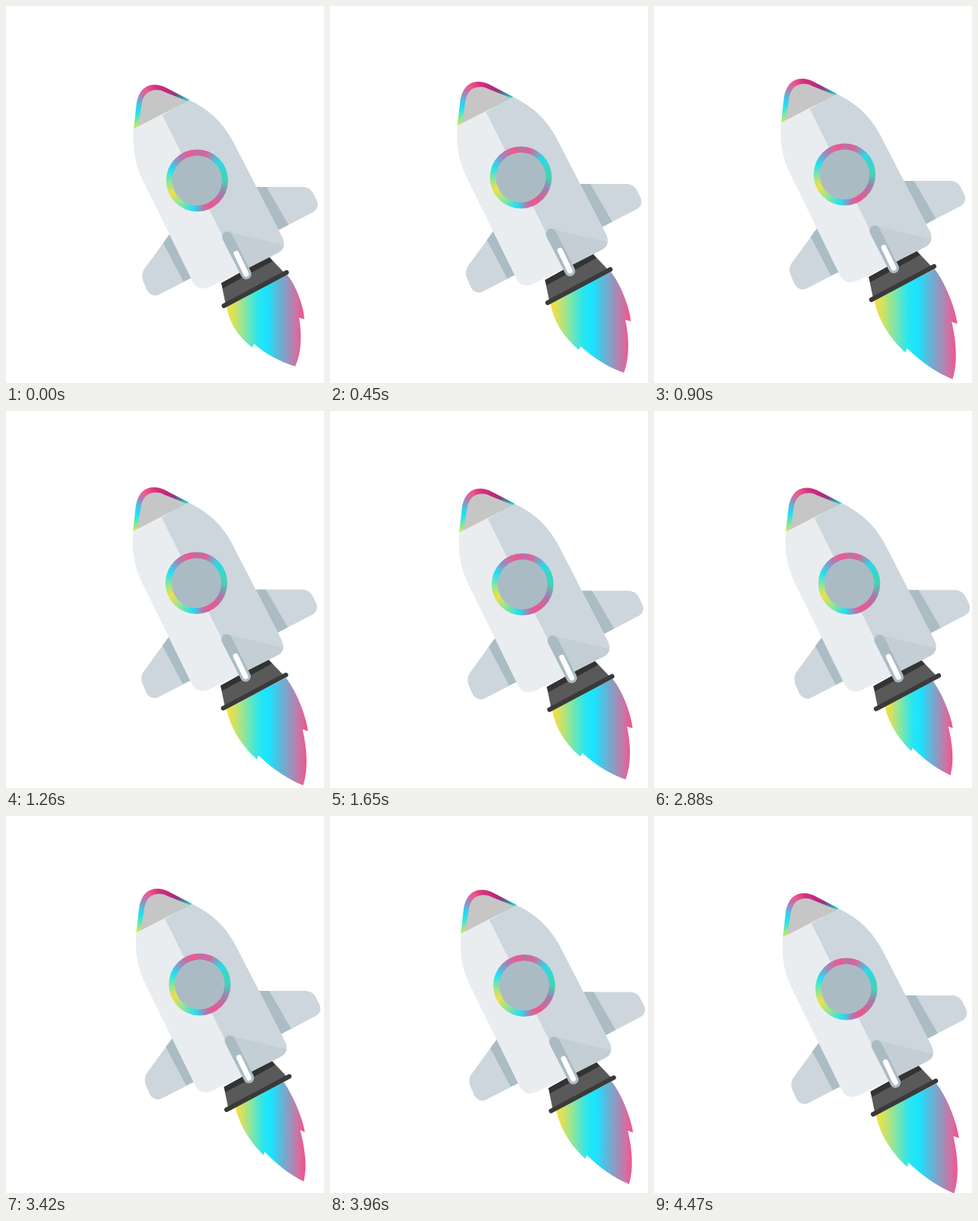
An HTML page with a canvas that plays this animation: 421 by 498 pixels, repeating every 4.5 s.

```html
<!DOCTYPE html>
<html>
<head>
<meta charset="utf-8">
<title>Rocket</title>
<style>
html, body { margin: 0; height: 100%; overflow: hidden; background: #fff; }
canvas { display: block; }
</style>
</head>
<body>
<canvas id="stage" width="421" height="498"></canvas>
<script>
const ctx = document.getElementById('stage').getContext('2d');
const LOOP = 4500, STEP = 30, TILT = 27.4;

// time, rocket x, rocket y, flame width, flame length
const poses = [
  [0, 0, 0, 1, 1],
  [900, -.7, -8, 1, 1.245],
  [1650, 2, -1.5, 1, 1.12],
  [2160, 3.5, -7, .93, 1.205],
  [2880, 5.5, -2.5, .8, 1.075],
  [3420, 3.5, -8, .8, 1.145],
  [4470, 1.6, -2, 1, 1.24]
];
const shake = [3.2, 2.6, .03, .05];

const flame = new Path2D('M292 396C295 419 309 438 326 451L328.5 446.5C345 460 362 470 383 476C392 456 391.5 432 388 412L395 413.5C394 396 384 369 372 355Z');

function fill(path, style) {
  ctx.fillStyle = style;
  ctx.fill(typeof path === 'string' ? new Path2D(path) : path);
}

function line(x1, y1, x2, y2, width, color) {
  ctx.beginPath();
  ctx.moveTo(x1, y1);
  ctx.lineTo(x2, y2);
  ctx.lineWidth = width;
  ctx.strokeStyle = color;
  ctx.stroke();
}

function disc(x, y, r, style) {
  ctx.beginPath();
  ctx.arc(x, y, r, 0, 2 * Math.PI);
  ctx.fillStyle = style;
  ctx.fill();
}

function addStops(gradient, stops) {
  for (const [at, color] of stops) gradient.addColorStop(at, color);
  return gradient;
}

const noseRainbow = addStops(ctx.createConicGradient(0, 205, 140), [
  [.4, '#e6e84a'], [.45, '#6fe6a8'], [.5, '#1fe3f2'], [.55, '#3cc8e8'],
  [.61, '#b07fb4'], [.66, '#f0568f'], [.72, '#d0327f'], [.8, '#c0267c'],
  [.86, '#85407f'], [.91, '#2f9fae'], [.94, '#27e0d8']
]);
const ringRainbow = addStops(ctx.createConicGradient(0, 253, 230.5), [
  [0, '#45d3b4'], [.07, '#a57cae'], [.17, '#ee5590'], [.21, '#c070a8'],
  [.27, '#22def5'], [.35, '#8fe59a'], [.43, '#efe04a'], [.48, '#a0e588'],
  [.56, '#20e2f5'], [.64, '#a584b8'], [.71, '#f0568f'], [.76, '#b872a6'],
  [.8, '#e0609a'], [.88, '#2cd8e6'], [1, '#45d3b4']
]);

function poseAt(time) {
  const i = Math.max(1, poses.findIndex(p => p[0] >= time));
  const a = poses[i - 1], b = poses[i];
  const span = b[0] - a[0], p = (time - a[0]) / span;
  const turns = Math.round(span / 190);
  return shake.map((size, k) =>
    a[k + 1] + (b[k + 1] - a[k + 1]) * p +
    size * Math.sin(2 * Math.PI * (turns + k % 2) * p));
}

function drawFlame(width, length) {
  const scaled = new Path2D();
  scaled.addPath(flame, new DOMMatrix().translate(330, 374).rotate(-TILT)
    .scale(width, length).rotate(TILT).translate(-330, -374));
  const left = 330 - 38 * width, right = 330 + 35 * width + 30 * length;
  fill(scaled, addStops(ctx.createLinearGradient(left, 0, right, 0), [
    [0, '#f8e03c'], [.1, '#d3e160'], [.22, '#8fe59b'], [.4, '#2ce6ee'],
    [.52, '#19e3ff'], [.64, '#55bddf'], [.8, '#9c91ba'], [.9, '#cf72a3'], [1, '#f84f88']
  ]));
}

function drawRocket() {
  // fins
  fill('M325 239H394Q402 240 406 246L412 258Q415 267 407 272L355 299Z', '#cdd6dc');
  fill('M325 239H345L374 289L355 299Z', '#abbcc4');
  fill('M217 301L182 349Q179 356 181 362L187 376Q192 384 201 382L252 356Z', '#cdd6dc');
  fill('M217 301L252 356L235 364L208 313Z', '#abbcc4');

  // nozzle
  fill('M285 366L348 331L369 353L291 395Z', '#595959');
  fill('M285 366L348 331L353 337L287 373Z', '#333');
  ctx.lineCap = 'round';
  line(288.5, 396, 371.5, 352, 6, '#3a3a3a');

  // hull
  fill('M169 161C167 186 170 207 181 230L246 362Q253 378 270 371L360 326Q372 319 366 306L302 182C288 154 268 136 242 124Z', '#e9edf0');
  fill('M207 144L242 124C268 136 288 154 302 182L366 306Q372 319 360 326L310 351Z', '#cdd6dc');
  fill('M288 297L368 316Q367 323 360 326L313 350Z', '#c3ced5');

  // nose
  fill('M169 162L173 127Q178 104 197 104Q205 104 214 109L243 124Z', noseRainbow);
  fill('M175 159L180 127Q184 112 197 111Q204 110 211 114L240 125.5Z', '#c6c6c6');

  // window
  disc(253, 230.5, 41, ringRainbow);
  disc(253, 230.5, 33, '#abbbc4');

  // front fin
  line(293, 305, 318, 354, 14, '#abbbc4');
  line(305, 327, 318, 354, 7, '#fff');
}

function draw() {
  const time = Math.floor(performance.now() % LOOP / STEP) * STEP;
  const [x, y, width, length] = poseAt(time);
  ctx.setTransform(1, 0, 0, 1, 0, 0);
  ctx.clearRect(0, 0, 421, 498);
  ctx.translate(x, y);
  drawFlame(width, length);
  drawRocket();
  requestAnimationFrame(draw);
}
draw();
</script>
</body>
</html>
```
